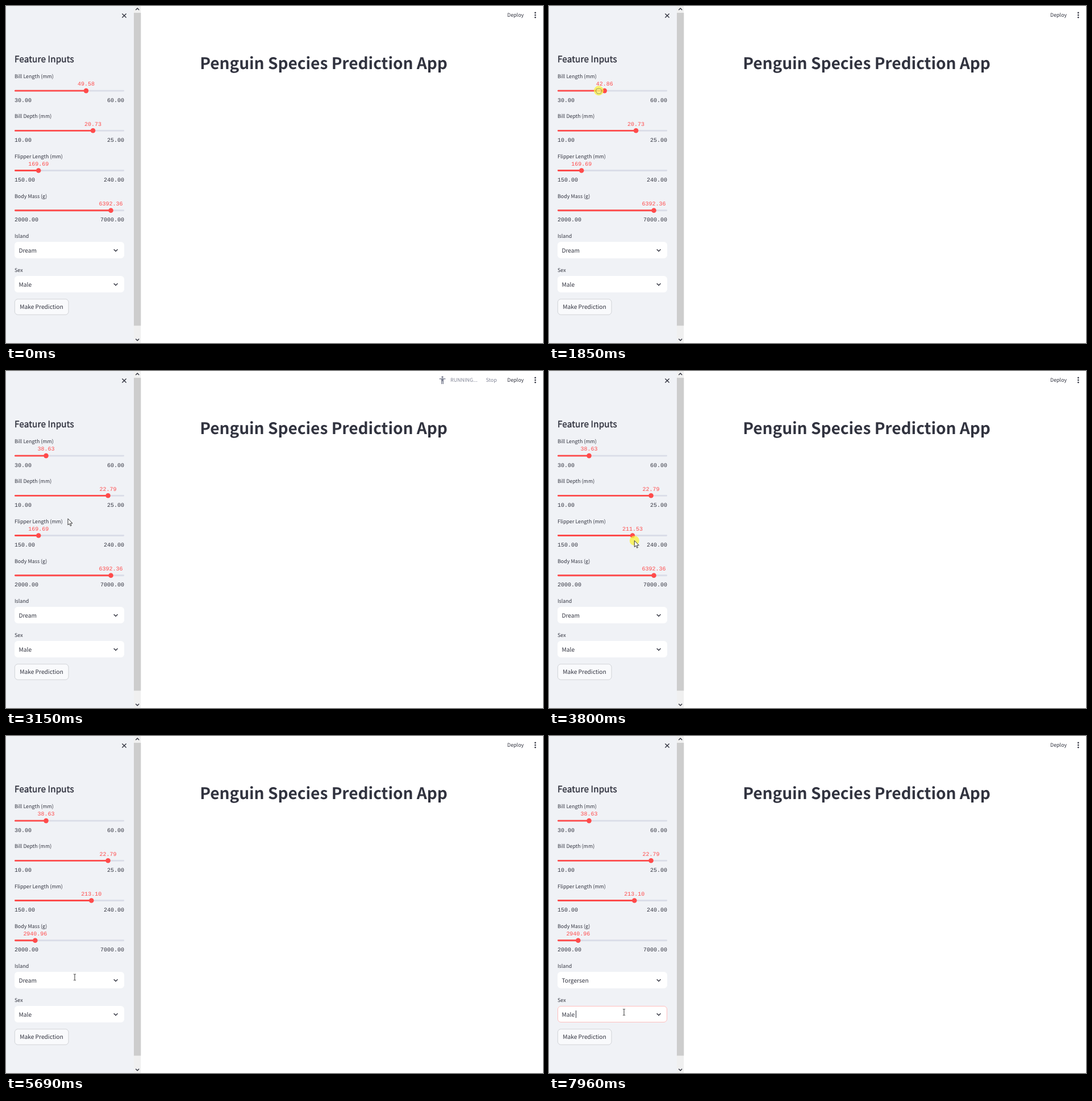
These frames come from a looping animation (945x593 px, 7.99 s). An HTML page:

```html
<!DOCTYPE html>
<html lang="en">
<head>
<meta charset="utf-8">
<title>Prediction App</title>
<style>
  html, body { margin: 0; width: 100%; height: 100%; overflow: hidden; background: #fff; }
  svg { display: block; width: 945px; height: 593px; }
  text {
    font-family: "Noto Sans CJK JP", "Noto Sans CJK SC", "Noto Sans CJK", "Open Sans", sans-serif;
    font-size: 8.93px; fill: #31333f; text-rendering: geometricPrecision; white-space: pre;
  }
  .title { font-size: 28.05px; font-weight: 700; }
  .head { font-size: 15.3px; letter-spacing: .13px; stroke: #31333f; stroke-width: .42px; }
  .body { font-size: 10.2px; }
  .mono { font-family: "Liberation Mono", "DejaVu Sans Mono", monospace; font-size: 9.97px; }
  .value { fill: #ff4b4b; text-anchor: middle; }
  .end { text-anchor: end; }
  .mid { text-anchor: middle; }
  .line { fill: none; stroke: #31333f; stroke-width: 1.4; }
  .grey { fill: #808495; }
  .ring { fill: none; stroke: #ff4b4b; }
  .caret { stroke: #31333f; }
  .menu { filter: drop-shadow(0 3px 5.5px rgba(0, 0, 0, .18)); }
  .cursor path { fill: #fff; stroke: #222; stroke-width: .9; stroke-linejoin: round; }
  .cursor #fist { fill-opacity: .2; stroke-width: .7; stroke-opacity: .6; }
  .cursor #beam { fill: none; }
</style>
</head>
<body>
<svg viewBox="0 0 945 593" id="stage"></svg>
<script>
const LOOP = 7990, LEFT = 15, WIDTH = 193, LAG = 80;
const OPEN = 5780, PICK = 6960, FOCUS = 7740;   // clicks on the select boxes
const ROW = 28.5, MENU = 444.5, ISLAND = 415, SEX = 475;
const islands = ['Biscoe', 'Dream', 'Torgersen'];

// drift: how far the pointer slips below the track during the drag
const sliders = [
  { label: 'Bill Length (mm)', min: 30, max: 60, from: 49.58, to: 38.63, press: 1500, release: 2130, drift: 0 },
  { label: 'Bill Depth (mm)', min: 10, max: 25, from: 20.73, to: 22.79, press: 2720, release: 3050, drift: 0 },
  { label: 'Flipper Length (mm)', min: 150, max: 240, from: 169.69, to: 213.1, press: 3400, release: 3834, drift: 9 },
  { label: 'Body Mass (g)', min: 2000, max: 7000, from: 6392.36, to: 2940.96, press: 4330, release: 5290, drift: 0 }
];
const trackY = i => 149.1 + 70.2 * i;
const thumbX = (s, value) => LEFT + WIDTH * (value - s.min) / (s.max - s.min);

// Pointer stops (time, x, y) away from the sliders, then those each drag adds
const path = [
  [400, 893, 593], [610, 373, 239], [760, 373, 239], [850, 136, 207], [1050, 136, 207],
  [1140, 140, 174], [2400, 176, 226], [OPEN, 128, 431], [5970, 128, 431], [6420, 125, 465.5],
  [6670, 125, 465.5], [6900, 115, 516], [PICK, 115, 516], [7250, 132, 486], [LOOP, 132, 486]
];
sliders.forEach((s, i) => {
  const y = trackY(i), a = thumbX(s, s.from), b = thumbX(s, s.to);
  path.push([s.press - 130, a, y], [s.press, a, y],
    [s.release - 80, b, y + s.drift], [s.release, b, y + s.drift]);
});
path.sort((a, b) => a[0] - b[0]);

const runs = [...sliders.map(s => s.release), PICK];
const presses = [OPEN, PICK - 60, FOCUS].map(t => [t, t + 100])
  .concat(sliders.map(s => [s.press, s.release]));

const text = (x, y, str, cls = '', id = '') =>
  `<text x="${x}" y="${y}" class="${cls}" id="${id}">${str}</text>`;
const rect = (x, y, w, h, fill, extra = '') =>
  `<rect x="${x}" y="${y}" width="${w}" height="${h}" fill="${fill}" ${extra}/>`;
const line = d => `<path class="line" d="${d}"/>`;

const sliderMarkup = (s, i) => {
  const y = trackY(i), ends = Math.round(y + 19.7);
  return text(LEFT, Math.round(y - 21.9), s.label) +
    rect(LEFT, y - 1.4, WIDTH, 2.9, '#dadde8', 'rx="1.4"') +
    rect(LEFT, y - 1.4, 0, 2.9, '#ff4b4b', `rx="1.4" id="fill${i}"`) +
    `<circle id="thumb${i}" cy="${y}" r="4.3" fill="#ff4b4b"/>` +
    text(0, Math.round(y - 8.7), '', 'mono value', 'value' + i) +
    text(LEFT, ends, s.min.toFixed(2), 'mono') +
    text(LEFT + WIDTH, ends, s.max.toFixed(2), 'mono end');
};
const selectMarkup = (name, y, value, caretX) =>
  text(LEFT, y - 7, name) +
  rect(LEFT, y, WIDTH, 29, '#fff', 'rx="5.7"') +
  text(22.5, y + 19, value, 'body', name) +
  line(`M189.7 ${y + 13.2}l3.4 3.4 3.4-3.4`) +
  `<rect id="${name}Ring" class="ring" x="15.5" y="${y + .5}" width="192" height="28" rx="5.4"/>` +
  `<path class="caret" id="${name}Caret" d="M${caretX} ${y + 8}v13"/>`;

const stage = document.getElementById('stage');
stage.innerHTML =
  rect(0, 0, 225, 593, '#f0f2f6') +
  rect(225, 0, 12.3, 593, '#f0f0f0') + rect(225, 12, 12.3, 550.5, '#cdcdcd') +
  line('M228.2 7l3-3 3 3M228.2 585.7l3 3 3-3') +
  line('M204.4 13.4l7.2 7.2M211.6 13.4l-7.2 7.2') +
  text(LEFT, 99, 'Feature Inputs', 'head') +
  sliders.map(sliderMarkup).join('') +
  selectMarkup('Island', ISLAND, 'Dream', 55.5) +
  selectMarkup('Sex', SEX, 'Male', 47.5) +
  rect(15.4, 515.8, 94.6, 27.4, '#f9fafc', 'rx="5.5" stroke="#31333f" stroke-opacity=".2" stroke-width=".9"') +
  text(62.5, 533, 'Make Prediction', 'body mid') +
  '<g id="menu" class="menu">' +
  `<path fill="#fff" d="M15 ${MENU}H208V524a5.7 5.7 0 0 1-5.7 5.7H20.7A5.7 5.7 0 0 1 15 524Z"/>` +
  rect(LEFT, MENU, WIDTH, ROW, '#f0f2f6', 'id="hover"') +
  islands.map((name, i) => text(26.3, Math.floor(MENU + 18.5 + ROW * i), name, 'body')).join('') + '</g>' +
  text(341.2, 111, 'Penguin Species Prediction App', 'title') +
  text(882, 19.4, 'Deploy') +
  [-4.1, 0, 4.1].map(d => `<circle cx="931.4" cy="${16 + d}" r="1.35" fill="#31333f"/>`).join('') +
  '<g id="status"><circle cx="768" cy="10.8" r="1.7" fill="#808495"/>' +
  '<path d="M762.6 13.8H773.4M768 13.8V18M766.7 14v9M769.3 14v9" stroke="#808495" stroke-width="1.5" fill="none"/>' +
  text(782, 19.4, 'RUNNING...', 'grey') + text(844.5, 19.4, 'Stop', 'grey') + '</g>' +
  '<g id="cursor" class="cursor"><circle id="halo" r="8.5" fill="#faf03c" fill-opacity=".75"/>' +
  '<path id="arrow" d="M0 0V11.2L2.6 8.8 4.4 12.9 6.1 12.1 4.4 8.2H8Z"/>' +
  '<path id="hand" d="M-1.3 9.5V1.2A1.3 1.3 0 0 1 1.3 1.2V5.5Q4.2 5 4.3 6.6 7.2 6.2 7.2 8.5V11.5Q7 13 6 14V16H-1.5V14.5L-5.2 9.6Q-5.4 8-3.6 8.4Z"/>' +
  '<path id="fist" d="M-4.5-1.5Q-4.5-4-2-3.5 0-4.5 2-3.5 4.8-3.8 4.8-1V1.5Q4.5 3 3.3 5H-2.5L-5 1Z"/>' +
  '<path id="beam" d="M-2-5.3H-.5L0-4.8.5-5.3H2M0-4.8V4.8M-2 5.3H-.5L0 4.8.5 5.3H2"/></g>';

const $ = id => document.getElementById(id);
const show = (id, on) => $(id).setAttribute('visibility', on ? 'visible' : 'hidden');
const clamp = (v, lo = 0, hi = 1) => Math.max(lo, Math.min(hi, v));
const within = (v, a, b) => v >= a && v < b;
const easeOut = p => 1 - (1 - p) ** 1.4;

function pointer(t) {
  const i = Math.max(1, path.findIndex(k => k[0] > t));
  const [t0, x0, y0] = path[i - 1], [t1, x1, y1] = path[i];
  const p = easeOut(clamp((t - t0) / (t1 - t0)));
  return [x0 + (x1 - x0) * p, y0 + (y1 - y0) * p];
}

// The thumb trails the pointer by LAG while it is held.
function drawSlider(s, i, t) {
  const x = pointer(clamp(t - LAG, s.press, s.release))[0];
  $('fill' + i).setAttribute('width', x - LEFT);
  $('thumb' + i).setAttribute('cx', x);
  $('value' + i).setAttribute('x', x);
  $('value' + i).textContent = (s.min + (x - LEFT) / WIDTH * (s.max - s.min)).toFixed(2);
  return x;
}

function cursorShape(x, y, thumbs, menuOpen) {
  if (thumbs.some((tx, i) => Math.abs(x - tx) < 20 && Math.abs(y - trackY(i)) < 5)) return 'fist';
  if (x > LEFT + WIDTH) return 'arrow';
  if (menuOpen && y > MENU) return 'hand';
  return [ISLAND, SEX].some(top => within(y, top, top + 29)) ? 'beam' : 'arrow';
}

function draw(t) {
  const thumbs = sliders.map((s, i) => drawSlider(s, i, t));
  const [x, y] = pointer(t);

  const menuOpen = within(t, OPEN + 70, PICK);
  show('menu', menuOpen);
  $('hover').setAttribute('y', MENU + ROW * clamp(Math.floor((y - MENU) / ROW), 0, 2));
  $('Island').textContent = islands[t < PICK ? 1 : 2];
  show('IslandCaret', within(t, OPEN, PICK));
  show('SexCaret', t >= FOCUS + 60);
  $('IslandRing').setAttribute('opacity', clamp((t - OPEN) / 150) * clamp((FOCUS + 150 - t) / 150));
  $('SexRing').setAttribute('opacity', clamp((t - FOCUS - 150) / 200));

  const age = t - Math.max(0, ...runs.filter(r => r <= t));
  $('status').setAttribute('opacity', t < runs[0] ? 0 : Math.min(clamp(age / 80), clamp((285 - age) / 150)));

  const shape = cursorShape(x, y, thumbs, menuOpen);
  for (const name of ['arrow', 'hand', 'fist', 'beam']) show(name, t >= 400 && name === shape);
  show('halo', presses.some(([a, b]) => within(t, a, b)));
  $('cursor').setAttribute('transform', `translate(${x} ${y})`);
}

const start = performance.now();
function tick() {
  draw((performance.now() - start) % LOOP);
  requestAnimationFrame(tick);
}
tick();
</script>
</body>
</html>
```
